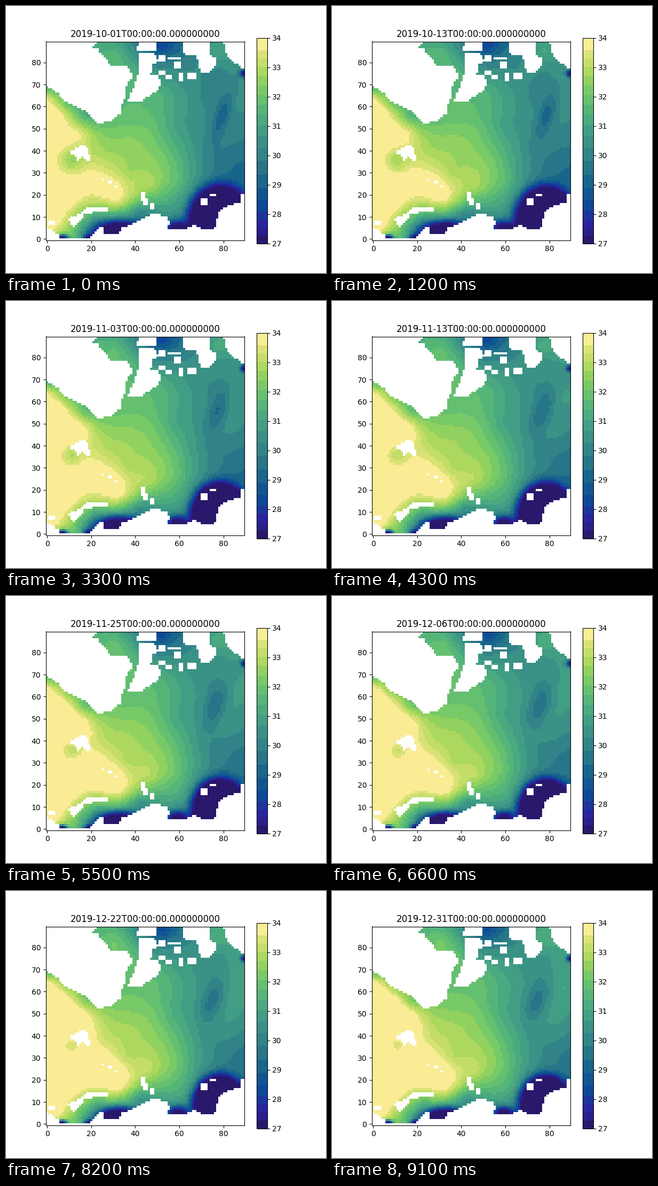
A matplotlib script that plays this animation: 600x500 px, repeating every 9.2 s.

```python
import numpy as np
import matplotlib.pyplot as plt
from matplotlib.animation import FuncAnimation
from matplotlib.colors import LinearSegmentedColormap, ListedColormap
from matplotlib.path import Path

plt.rcParams["text.kerning_factor"] = 6

N, DAYS = 90, 92
VMIN, VMAX = 27, 34
CELL = 372 / N

# Cell centres in stage pixels, row 0 at the bottom
cols, rows = np.meshgrid(np.arange(N), np.arange(N))
cx = 75 + (cols + 0.5) * CELL
cy = 438.5 - (rows + 0.5) * CELL

# Key points of each coast, in stage pixels
west = [(70, 150), (80, 151), (97, 162), (107, 176), (154, 200), (172, 221),
        (179, 221), (182, 215), (197, 216), (216, 199), (217, 182), (224, 170),
        (225, 150), (237, 132), (228, 110), (196, 110), (171, 79), (158, 79),
        (171, 67), (171, 60), (70, 60)]
central = [(249, 88), (249, 121), (229, 178), (253, 178), (284, 157),
           (290, 144), (285, 130), (270, 129), (274, 109), (286, 104),
           (278, 88)]
north = [(250, 60), (245, 84), (282, 84), (282, 60)]
north_east = [(331, 60), (331, 88), (357, 93), (365, 125), (378, 125),
              (394, 110), (393, 97), (382, 92), (378, 60)]
east = [(405, 60), (414, 96), (450, 121), (450, 60)]
spit = [(117, 397), (138, 388), (154, 376), (191, 376), (191, 384), (150, 388),
        (130, 409), (125, 418)]
south_west = [(70, 409), (101, 430), (101, 440), (70, 440)]
south = [(158, 434), (167, 422), (183, 410), (183, 426), (212, 426),
         (215, 417), (274, 389), (299, 392), (305, 404), (303, 417),
         (340, 417), (349, 409), (365, 417), (390, 417), (401, 380),
         (438, 366), (438, 355), (450, 346), (450, 440), (158, 440)]
bay_island = [(121, 271), (138, 262), (150, 262), (160, 290), (150, 290),
              (144, 281), (133, 292), (130, 279), (121, 279)]
# Small islands as boxes: left, top, right, bottom
boxes = [
    (179, 323, 183, 327), (191, 327, 200, 332), (204, 336, 208, 340),
    (80, 403, 92, 410), (253, 349, 261, 363), (257, 359, 266, 372),
    (270, 368, 278, 380), (365, 361, 378, 374), (382, 351, 394, 357),
    (286, 92, 299, 104), (303, 94, 327, 101), (315, 105, 327, 117),
    (286, 121, 299, 130), (299, 130, 311, 138), (321, 125, 332, 142),
    (340, 125, 357, 138)]


def inside(polygon):
    points = np.column_stack([cx.ravel(), cy.ravel()])
    return Path(polygon).contains_points(points).reshape(N, N)


land = rows == 0
for coast in (west, central, north, north_east, east, spit, south_west, south,
              bay_island):
    land |= inside(coast)
for x0, y0, x1, y1 in boxes:
    land |= (cx > x0) & (cx < x1) & (cy > y0) & (cy < y1)

# Key points of the first day's background field: x, y, salinity
soundings = np.array([
    (78, 157, 32.0), (76, 172, 33.5), (105, 198, 33.4), (112, 183, 32.2),
    (150, 203, 31.3), (140, 240, 33.6), (172, 226, 32.1), (185, 270, 32.7),
    (122, 288, 32.6), (150, 308, 33.6), (95, 240, 34.5), (110, 350, 34.6),
    (95, 410, 33.7), (190, 350, 34.0), (212, 362, 33.6), (240, 365, 32.3),
    (140, 415, 31.5), (170, 400, 30.8), (250, 388, 30.2), (230, 255, 32.5),
    (230, 310, 32.75), (270, 335, 32.8), (270, 235, 32.05), (230, 200, 31.8),
    (290, 165, 31.4), (305, 285, 31.95), (322, 325, 31.7), (310, 380, 30.8),
    (320, 225, 30.9), (345, 175, 30.6), (350, 290, 30.8), (350, 345, 30.6),
    (385, 170, 30.0), (385, 280, 29.9), (420, 245, 30.0), (435, 180, 30.4),
    (435, 310, 29.2), (400, 120, 30.2), (395, 85, 31.0), (305, 105, 29.9),
    (290, 74, 28.2), (205, 90, 31.5), (240, 120, 31.3), (225, 178, 31.7)])
sx, sy, values = soundings.T

# Fresh water pools: x, y, radii, softness of the edge
plumes = [(400, 400, 62, 70, 0.08), (212, 428, 54, 28, 0.15),
          (322, 416, 22, 14, 0.3), (156, 434, 9, 7, 0.3),
          (105, 434, 10, 6, 0.3), (447, 126, 8, 6, 0.3)]


def kernel(x, y):
    return np.sqrt((x[..., None] - sx) ** 2 + (y[..., None] - sy) ** 2 + 50)


def bump(x, y, width, height):
    return np.exp(-((cx - x) / width) ** 2 - ((cy - y) / height) ** 2)


background = kernel(cx, cy) @ np.linalg.solve(kernel(sx, sy), values - 31) + 31
change = (0.25 + 0.9 * bump(130, 230, 60, 90) + 0.45 * bump(200, 390, 90, 40)
          + 0.5 * bump(420, 220, 50, 120) + 0.3 * bump(215, 100, 40, 50)
          + 0.3 * bump(335, 370, 40, 40))


def salinity(day):
    mix = (day / (DAYS - 1)) ** 0.85
    field = background + mix * change
    # Tilted fresh eye that drifts west and grows rounder
    tilted_x = 404 - 20 * mix - 0.3 * (cy - 206)
    field -= 1.15 * bump(tilted_x, 206, 14 + 8 * mix, 42 - 4 * mix)
    for x, y, rx, ry, soft in plumes:
        size = 1 - 0.15 * mix
        distance = np.hypot((cx - x) / rx, (cy - y) / ry) / size
        field += (26.5 - field) / (1 + np.exp((distance - 1) / soft))
    return np.ma.array(field, mask=land)


def banded_haline():
    stops = [(41, 24, 107), (42, 35, 160), (15, 71, 153), (18, 95, 142),
             (38, 116, 137), (53, 136, 136), (65, 157, 133), (81, 178, 124),
             (111, 198, 107), (160, 214, 91), (212, 225, 112), (253, 238, 153)]
    smooth = LinearSegmentedColormap.from_list("haline", np.array(stops) / 255)
    edges = np.array([0, 15, 30, 45, 61, 82, 104, 129, 155, 179, 202, 222,
                      241, 260, 278, 296, 314, 331, 347, 362, 385])
    levels = (edges[:-1] + edges[1:]) / 2 / 385
    levels[0], levels[-1] = 0, 0.99
    return ListedColormap(np.repeat(smooth(levels), np.diff(edges), axis=0))


fig, ax = plt.subplots(figsize=(6, 5), dpi=100)
image = ax.imshow(salinity(0), origin="lower", cmap=banded_haline(),
                  vmin=VMIN, vmax=VMAX, interpolation="nearest")
fig.colorbar(image, ax=ax)
ax.set_xticks(range(0, 90, 20))
ax.set_yticks(range(0, 90, 10))
title = ax.set_title("")


def update(day):
    image.set_data(salinity(day))
    date = np.datetime64("2019-10-01") + day
    title.set_text(f"{date}T00:00:00.000000000")
    return image, title


anim = FuncAnimation(fig, update, frames=DAYS, interval=100, repeat=True)
plt.show()
```
